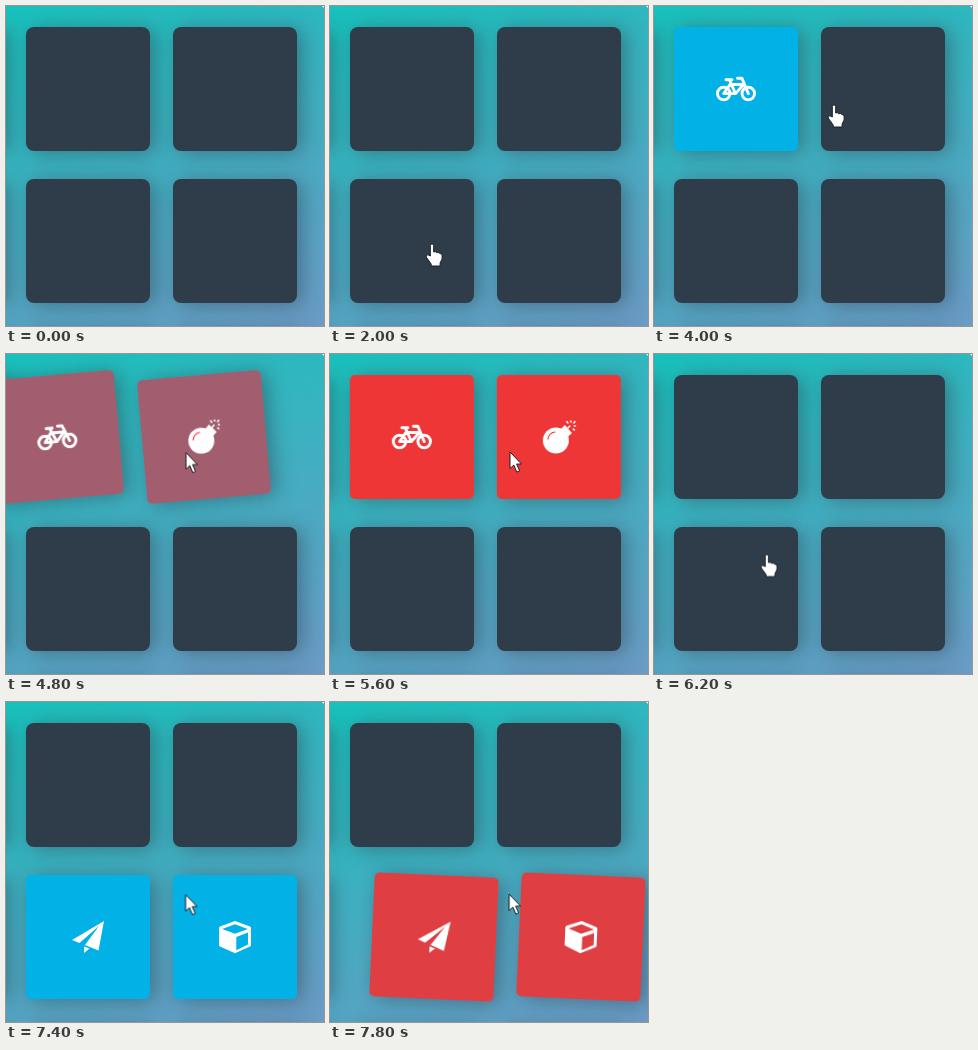
These frames come from a looping animation (318 px wide and 320 px high, 8 s). An HTML page:

```html
<!DOCTYPE html>
<html lang="en">
<head>
<meta charset="utf-8">
<title>Memory cards</title>
<style>
  html, body { margin: 0; width: 100%; height: 100%; overflow: hidden; background: #fff; }
  #stage { position: relative; width: 318px; height: 320px; overflow: hidden; }
  #deck {
    position: absolute; left: -300px; top: -2px; width: 620px; height: 640px;
    border-radius: 10px; background: linear-gradient(160deg, #02ccba, #aa7ecd);
  }
  .card {
    position: absolute; width: 124px; height: 124px; border-radius: 8px;
    background: #2e3d49; box-shadow: 5px 2px 20px rgba(46, 61, 73, .5);
  }
  svg { position: absolute; width: 1px; height: 1px; overflow: visible; }
  .card svg { left: 62px; top: 62px; fill: #fff; stroke: #fff; stroke-width: 0; transform: scale(0); }
  .line { fill: none; stroke-width: 2.9; stroke-linejoin: round; stroke-linecap: round; }
  #cursor { position: absolute; left: 0; top: 0; }
  #cursor path { fill: #fff; stroke: #1b1f24; stroke-linejoin: round; }
</style>
</head>
<body>
<div id="stage">
  <div id="deck"></div>
  <div id="cursor">
    <svg id="hand"><path d="M-1.7 12V1.6a1.7 1.7 0 0 1 3.4 0V8q2-1 3 .7 2-.8 3 .8 2.4-.4 2.4 2V15l-2 4v3H-.8v-2l-5-7q-.6-2.6 1.8-2.2z"/></svg>
    <svg id="arrow"><path d="M0 0V16.5L3.8 13l3 7 2.8-1.2-3-6.8H11.5z"/></svg>
  </div>
</div>
<script>
const LOOP = 8000, STEP = 200, FLIP = 300, WOBBLE = 1000, CLOSE_AFTER = 1200;
const DARK = '#2e3d49', BLUE = '#02b1e6', RED = '#ef3636';

const icons = {
  bike: `<g class="line"><circle cx="-12.3" cy="4.6" r="6.3"/><circle cx="12.3" cy="4.6" r="6.3"/>
    <path d="M-12.3 4.6-6-4.5H7.5L-.5 4.6zM-.5 4.6-6.5-9M-10-9.3H-4M12.3 4.6 6-10.8H1.5"/></g>`,
  bomb: `<circle cx="-3" cy="3.5" r="13"/><path d="M2-8 6-12 13-4 9 0z"/>
    <path class="line" style="stroke-width:1.5" d="M8-8 11-11M12-15V-16M15-14 16-15.5M15.5-11H16.5M14.5-8 15.5-7M9-14 8-15.5"/>
    <path class="line" style="stroke:${RED};stroke-width:1.2" d="M-11 2Q-10-4-4-5"/>`,
  plane: '<path d="M-16 3 16-16 10.5 13.5-3 8 11-11-8.5 6zM-4 9.5V16L1.5 11.5z"/>',
  cube: `<path fill-rule="evenodd" d="M0-16 15-10.5Q16-10 16-9V8Q16 9 15 9.5L0 16.3-15 9.5Q-16 9-16 8V-9Q-16-10-15-10.5z
    M0-12.7 12.8-8 0-3.3-12.8-8zM1.3 0 13-4.4V7.4L1.3 13.2z"/>`
};

const deals = [
  { col: 1, row: 0, icon: 'bike', open: 3150, miss: 4650 },
  { col: 2, row: 0, icon: 'bomb', open: 4150, miss: 4650 },
  { col: 1, row: 1, icon: 'plane', open: 6300, miss: 7542 },
  { col: 2, row: 1, icon: 'cube', open: 7042, miss: 7542 }
];

const sway = [[0, 0, 0], [.15, -25, -5], [.3, 20, 3], [.45, -15, -3], [.6, 10, 2], [.75, -5, -1], [1, 0, 0]];

// Pointer tip: time, x, y
const path = [[0, 150, 400], [1150, 127, 322], [1950, 102, 238], [2300, 102, 238], [2900, 98, 108],
  [3250, 98, 108], [3850, 180, 99], [5900, 180, 98], [6250, 110, 205], [6400, 110, 205], [6900, 180, 193], [LOOP, 179, 192]];
const handTimes = [[1500, 3150], [3700, 4150], [5850, 6300], [6800, 7042]];

const [deck, cursor, hand, arrow] = ['deck', 'cursor', 'hand', 'arrow'].map(id => document.getElementById(id));
const timelines = [];

// frames: [time, style] pairs; the base style applies outside their span
function schedule(el, frames, easing = 'ease') {
  const start = frames[0][0], duration = frames.at(-1)[0] - start;
  const keys = frames.map(([time, style]) => ({ offset: (time - start) / duration, easing, ...style }));
  const timeline = el.animate(keys, { delay: start, duration });
  timeline.pause();
  timelines.push(timeline);
}

const pose = (x, angle, flip) => ({ transform: `translateX(${x}%) rotate(${angle}deg) rotateY(${flip}deg)` });
const fill = (background, radius) => ({ backgroundColor: background, borderRadius: radius + 'px' });
const size = scale => ({ transform: `scale(${scale})` });

function play(card, { open, miss }) {
  const close = miss + CLOSE_AFTER, end = close + FLIP;
  schedule(card, [
    [open, pose(0, 0, -180)], [open + FLIP, pose(0, 0, 0)],
    ...sway.map(([part, x, angle]) => [miss + part * WOBBLE, pose(x, angle, 0)]),
    [close, pose(0, 0, 0)], [end, pose(0, 0, -180)]
  ]);
  schedule(card, [
    [open, fill(DARK, 8)], [open + FLIP, fill(BLUE, 5)], [miss, fill(BLUE, 5)],
    [miss + 380, fill(RED, 5)], [close, fill(RED, 5)], [end, fill(DARK, 8)]
  ]);
  schedule(card.firstChild, [[open, size(0)], [open + FLIP, size(1)], [close, size(1)], [end, size(0)]]);
}

for (let row = 0; row < 3; row++) {
  for (let col = 0; col < 3; col++) {
    const card = document.createElement('div');
    card.className = 'card';
    card.style.left = -127 + col * 147 + 'px';
    card.style.top = 21 + row * 152 + 'px';
    cursor.before(card);
    const deal = deals.find(d => d.col === col && d.row === row);
    if (deal) {
      card.innerHTML = `<svg>${icons[deal.icon]}</svg>`;
      play(card, deal);
    }
  }
}
schedule(cursor, path.map(([time, x, y]) => [time, { transform: `translate(${x}px, ${y}px)` }]), 'ease-in-out');

function draw() {
  const time = Math.floor(performance.now() % LOOP / STEP) * STEP;
  for (const timeline of timelines) timeline.currentTime = time;
  const pointing = handTimes.some(([from, to]) => time >= from && time < to);
  cursor.style.visibility = time < 1200 ? 'hidden' : 'visible';
  hand.style.display = pointing ? 'block' : 'none';
  arrow.style.display = pointing ? 'none' : 'block';
  requestAnimationFrame(draw);
}
draw();
</script>
</body>
</html>
```
